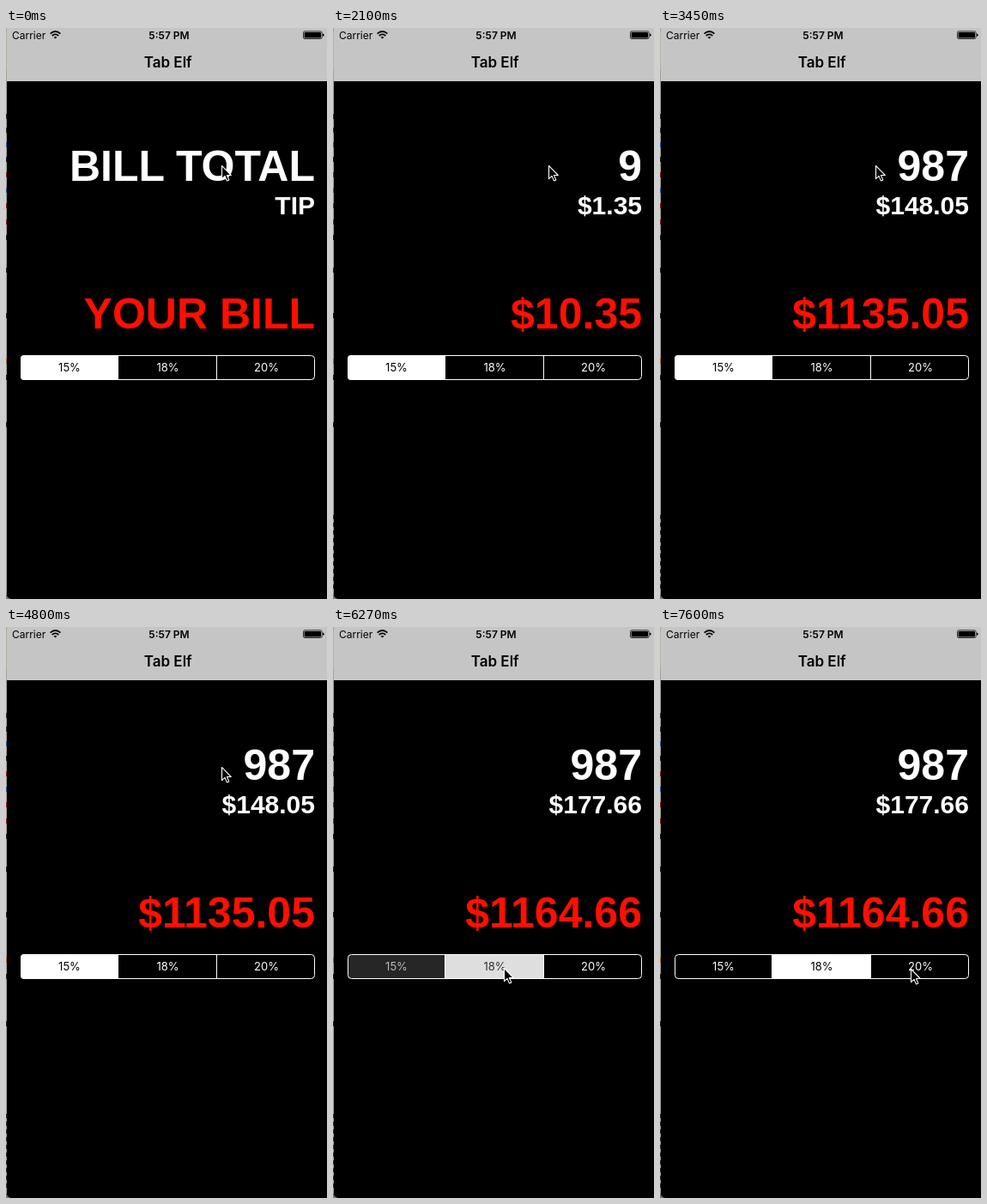
Animation of 374 by 665 pixels, one loop 8 s. Source, as an HTML page:

```html
<!DOCTYPE html>
<html lang="en">
<head>
<meta charset="utf-8">
<title>Tip calculator</title>
<style>
  html, body { margin: 0; width: 100%; height: 100%; overflow: hidden; background: #000; }
  svg { display: block; width: 374px; height: 665px; }
  .ui { font-family: Inter, Roboto, sans-serif; }
  .num { font-family: "Liberation Sans", Arial, sans-serif; font-weight: 700; text-anchor: end; }
  .mid { text-anchor: middle; }
</style>
</head>
<body>
<svg viewBox="0 0 374 665" xmlns="http://www.w3.org/2000/svg">
  <defs><clipPath id="round"><rect x="17" y="381" width="343" height="29" rx="4"/></clipPath></defs>
  <rect width="374" height="665" fill="#000"/>
  <rect width="374" height="62" fill="#c5c5c5"/>

  <g id="edge"></g>
  <path d="M0 658 Q1 664 6 665 H0 Z" fill="#77776f"/>

  <g class="ui" fill="#000">
    <text x="7" y="12.5" font-size="12">Carrier</text>
    <text class="mid" x="190" y="12.5" font-size="12" font-weight="600">5:57 PM</text>
    <text class="mid" x="188.7" y="46" font-size="17" font-weight="600">Tab Elf</text>
  </g>
  <g fill="none" stroke="#000" stroke-width="1.7">
    <path d="M51.6 6.6 Q57.5 1.4 63.4 6.6"/>
    <path d="M53.7 9 Q57.5 5.6 61.3 9"/>
    <path d="M57.5 12.6 L55.6 10.7 Q57.5 9.1 59.4 10.7 Z" fill="#000" stroke="none"/>
  </g>
  <rect x="346.5" y="3.9" width="21.6" height="8.6" rx="1.6" fill="none" stroke="#000" stroke-width=".8"/>
  <rect x="347.6" y="5" width="19.4" height="6.4" rx=".7"/>
  <path d="M369 6.6 Q370.6 7 370.6 8.2 T369 9.8 Z"/>

  <g class="num" fill="#fff">
    <text id="bill" x="360" y="178" font-size="50"></text>
    <text id="tip" x="360" y="217" font-size="30"></text>
    <text id="total" x="360" y="350" font-size="50" fill="#ff0f00"></text>
  </g>
  <rect id="caret" x="358" y="138" width="2" height="46" fill="#000"/>

  <g clip-path="url(#round)" id="fills"></g>
  <rect x="17.5" y="381.5" width="342" height="28" rx="4" fill="none" stroke="#fff"/>
  <path d="M130.5 381 V410 M245.5 381 V410" stroke="#fff"/>
  <g class="ui mid" font-size="13" id="labels"></g>

  <path id="mouse" d="M0 0 V15.2 L3.5 11.9 L5.9 17.4 L8.3 16.4 L5.9 11 H10.8 Z"
        fill="#000" stroke="#fff" stroke-width="1.1" stroke-linejoin="round"/>
</svg>
<script>
const LOOP = 8000;
const $ = id => document.getElementById(id);

function add(parent, tag, attrs, text = '') {
  const el = document.createElementNS('http://www.w3.org/2000/svg', tag);
  for (const k in attrs) el.setAttribute(k, attrs[k]);
  el.textContent = text;
  parent.appendChild(el);
  return el;
}

// Last entry [time, ...] that has begun
const at = (list, t) => list.filter(e => e[0] <= t).pop();

// Desktop sliver along the left side
const edge = $('edge');
add(edge, 'rect', { width: 1, height: 665, fill: '#a3a39a' });
add(edge, 'rect', { y: 4, width: 1, height: 45, fill: '#b5b3a0' });
[[100, '#333'], [116, '#333'], [133, '#2a62b0'], [150, '#222'], [168, '#a02020'], [186, '#2a62b0'],
 [204, '#a02020'], [223, '#a02020'], [241, '#222'], [279, '#222'], [332, '#222'], [385, '#b06a18'],
 [404, '#222'], [459, '#222']]
  .forEach(([y, fill]) => add(edge, 'rect', { y, width: 1, height: 6, fill }));
const ticks = add(edge, 'g', {});
for (let y = 567; y < 655; y += 9) add(ticks, 'rect', { y, width: 1, height: 5, fill: '#333' });

const segs = [['15%', 17, 114, 74], ['18%', 131, 115, 188.5], ['20%', 246, 114, 303.5]].map(
  ([name, x, width, mid]) => ({
    fill: add($('fills'), 'rect', { x, y: 381, width, height: 29 }),
    label: add($('labels'), 'text', { x: mid, y: 400 }, name)
  }));

const amounts = [[0, 'BILL TOTAL'], [300, ''], [2100, 9], [2400, 98], [3450, 987]];

// Fill and label greys for the first two segments
const states = [
  [0, 255, 0, 0, 255],
  [6120, 255, 0, 52, 255],
  [6270, 38, 185, 222, 50],
  [6420, 0, 255, 255, 0]
];

const path = [
  [0, 251, 160], [4800, 251, 163], [4940, 230, 283], [5090, 229, 355], [5240, 225, 380],
  [5380, 205, 394], [5530, 199, 397], [7020, 218, 400], [7160, 243, 403], [7310, 273, 400],
  [7450, 292, 398]
];

const blink = [
  [0, 0], [300, 1], [4200, 0], [4650, 1], [5090, 0], [5530, .6], [5680, 1], [6120, .4],
  [6270, 0], [6570, 1], [7020, .4], [7160, 0], [7600, 1]
];

const gray = v => `rgb(${v},${v},${v})`;
const money = v => '$' + v.toFixed(2);

function setText(el, s) {
  if (el.textContent !== s) el.textContent = s;
}

function draw(t) {
  const bill = at(amounts, t)[1];
  const typed = typeof bill === 'number';
  const tip = Math.round(bill * (t < 6270 ? 15 : 18)) / 100;
  setText($('bill'), String(bill));
  setText($('tip'), typed ? money(tip) : 'TIP');
  setText($('total'), typed ? money(bill + tip) : 'YOUR BILL');

  const s = at(states, t);
  segs.forEach((seg, i) => {
    seg.fill.setAttribute('fill', gray(i < 2 ? s[1 + 2 * i] : 0));
    seg.label.setAttribute('fill', gray(i < 2 ? s[2 + 2 * i] : 255));
  });

  const [, x, y] = at(path, t);
  $('mouse').setAttribute('transform', `translate(${x + .5} ${y + .5})`);
  $('caret').setAttribute('opacity', at(blink, t)[1]);
  ticks.setAttribute('opacity', t < 300 ? 0 : 1);
}

const start = performance.now();
function frame(now) {
  draw(Math.max(0, now - start) % LOOP);
  requestAnimationFrame(frame);
}
draw(0);
requestAnimationFrame(frame);
</script>
</body>
</html>
```
